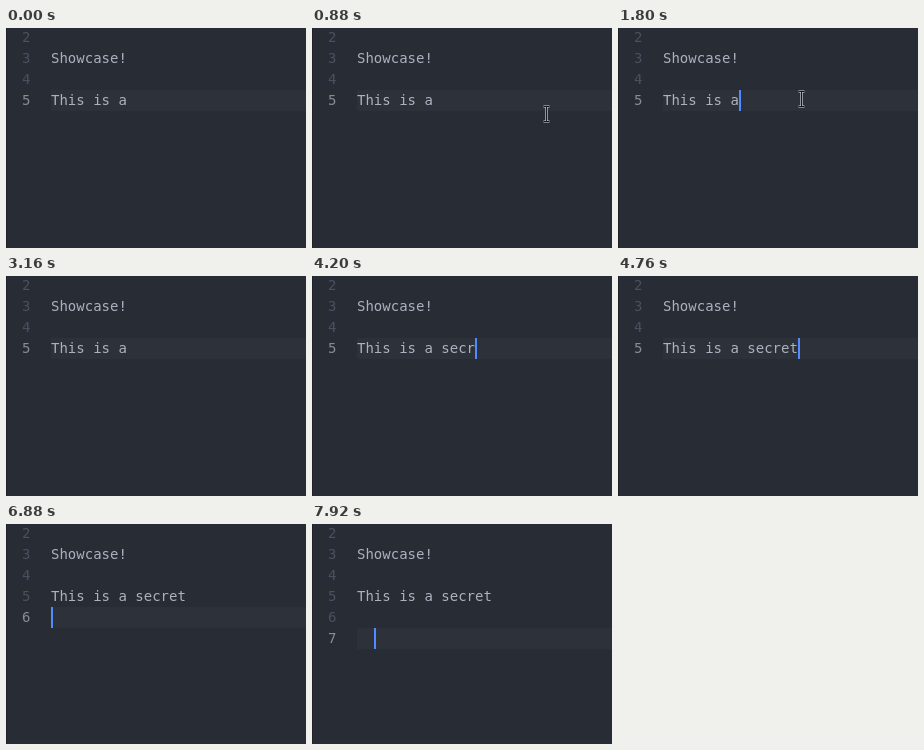
An HTML page for the animation above (8 s loop, 300x220 px).

```html
<!DOCTYPE html>
<html lang="en">
<head>
<meta charset="utf-8">
<title>Editor typing</title>
<style>
  html, body { margin: 0; width: 100%; height: 100%; overflow: hidden; background: #282c34; }
  #stage {
    position: relative; width: 300px; height: 220px; overflow: hidden;
    background: #282c34; color: #abb2bf;
    font: 14px/21px "DejaVu Sans Mono", monospace;
  }
  #stage > * { position: absolute; }
  #edge { left: 0; top: 0; width: 1px; height: 220px; background: #1f2229; }
  #band { left: 45px; right: 0; height: 21px; background: #2c313a; }
  .number { left: 16px; color: #495162; }
  .number.active { color: #868c98; }
  .text { left: 45px; white-space: pre; }
  #caret { width: 2px; height: 21px; background: #528bff; }
  #mouse { left: 0; top: 0; overflow: visible; }
</style>
</head>
<body>
<div id="stage">
  <div id="edge"></div>
  <div id="band"></div>
  <div id="caret"></div>
  <svg id="mouse" width="1" height="1" fill="none">
    <defs><path id="beam" d="M-3 -7.5H3M0 -7.5V7.5M-3 7.5H3"/></defs>
    <use href="#beam" stroke="#d8dade" stroke-width="2.2"/>
    <use href="#beam" stroke="#15171b" stroke-width="1"/>
  </svg>
</div>
<script>
const LOOP = 8000, LEFT = 45, ADVANCE = 8.43;
const START = "This is a", FULL = "This is a secret";
const TYPING = 3320, KEY_GAP = 178;
const CARET_HOLD = 490, BLINK = 400;

const edit = (time, line, column) => ({ time, line, column });
const keystrokes = [...FULL.slice(START.length)].map((_, i) =>
  edit(TYPING + i * KEY_GAP, 5, START.length + i + 1));
const edits = [
  edit(1160, 4, 0),
  edit(1760, 5, START.length),
  edit(1860, 5, START.length),
  ...keystrokes,
  edit(6640, 6, 0),
  edit(7140, 7, 0),
  edit(7920, 7, 2)
];

const stage = document.getElementById("stage");
const band = document.getElementById("band");
const caret = document.getElementById("caret");
const mouse = document.getElementById("mouse");

const rowTop = line => (line - 3) * 21 + 20;
const show = (el, visible) => { el.style.display = visible ? "" : "none"; };

function addText(className, line, content) {
  const el = document.createElement("div");
  el.className = className;
  el.style.top = rowTop(line) + "px";
  el.textContent = content;
  stage.insertBefore(el, caret);
  return el;
}

const numbers = Array.from({ length: 6 }, (_, i) => addText("number", i + 2, i + 2));
addText("text", 3, "Showcase!");
const sentence = addText("text", 5, START);

// Solid after each edit, then toggling
const caretVisible = age =>
  age < CARET_HOLD || Math.floor((age - CARET_HOLD) / BLINK) % 2 === 1;

function ease(t, from, to) {
  const p = Math.min(1, Math.max(0, (t - from) / (to - from)));
  return p * p * (3 - 2 * p);
}

// Enter, click line 4, drift up, click line 5, leave
function drawMouse(t) {
  const enter = ease(t, 860, 1140), drift = ease(t, 1240, 1480);
  const lower = ease(t, 1620, 1760), leave = ease(t, 1860, 1980);
  const x = 236 - 52 * enter + 52 * leave;
  const y = 86 - 31 * enter - 15 * drift + 31 * lower + 15 * leave;
  show(mouse, t >= 880 && t < 1960);
  mouse.style.transform = `translate(${Math.round(x) - .5}px, ${Math.round(y)}px)`;
}

function drawCaret(t, last) {
  show(caret, last && caretVisible(t - last.time));
  if (!last) return;
  caret.style.left = Math.round(LEFT + last.column * ADVANCE) + "px";
  caret.style.top = rowTop(last.line) + "px";
}

function draw(t) {
  const past = edits.filter(e => e.time <= t);
  const last = past[past.length - 1];
  const active = last ? last.line : 5;
  const typed = Math.max(START.length, ...past.map(e => e.column));

  sentence.textContent = FULL.slice(0, typed);
  band.style.top = rowTop(active) + "px";
  numbers.forEach((el, i) => {
    el.classList.toggle("active", i + 2 === active);
    show(el, i + 2 <= Math.max(5, active));
  });
  drawCaret(t, last);
  drawMouse(t);
}

const begin = performance.now();
function tick() {
  draw((performance.now() - begin) % LOOP);
  requestAnimationFrame(tick);
}
tick();
</script>
</body>
</html>
```
